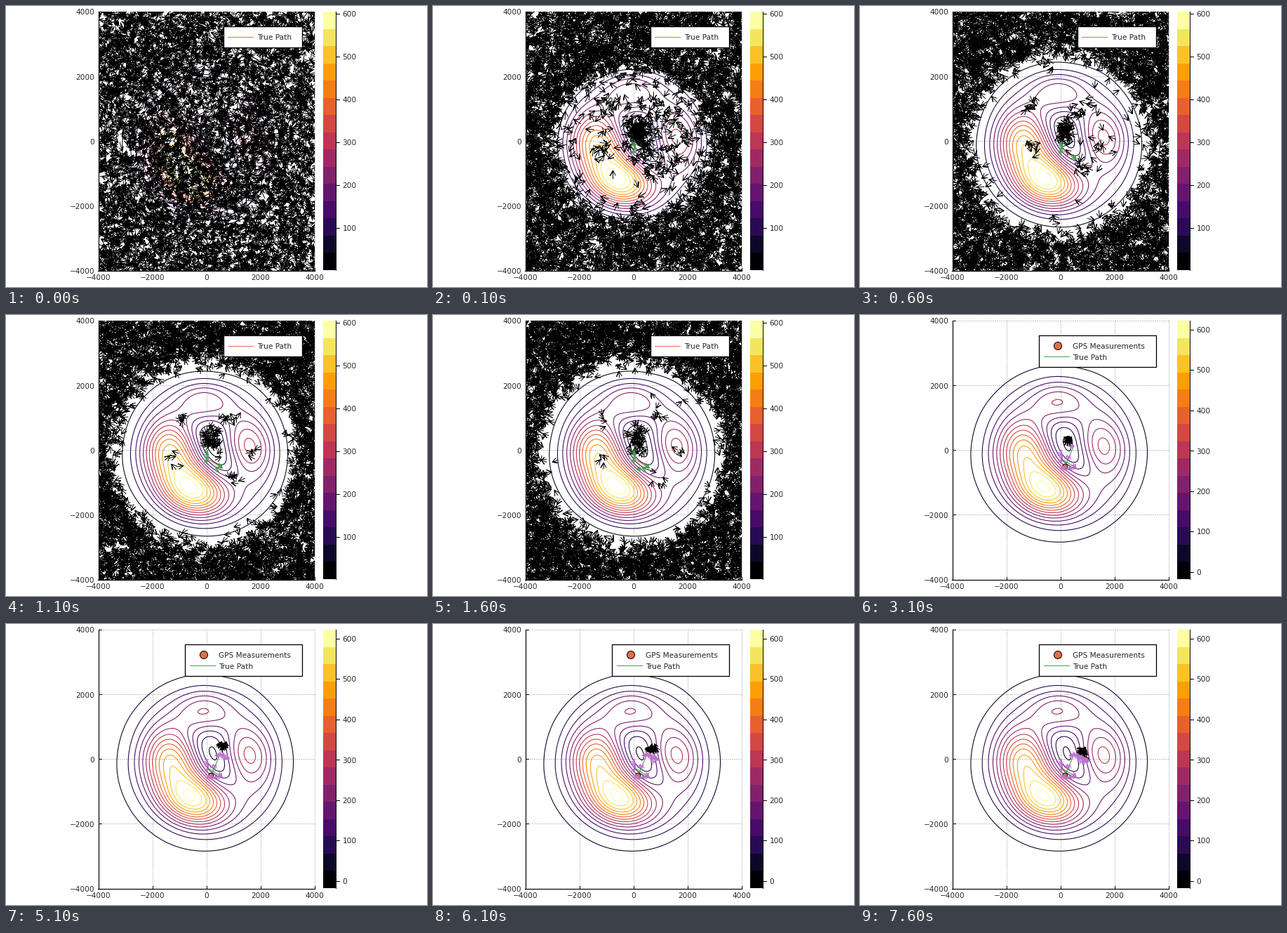
Write a matplotlib script that moves like this. It is 600x400 px and loops after 8000 ms.

```python
import numpy as np
import matplotlib.pyplot as plt
from matplotlib.animation import FuncAnimation
from matplotlib.collections import LineCollection
from matplotlib.patches import Circle, Rectangle

W, H = 600, 400
LEFT, RIGHT, TOP, BOTTOM = 131.5, 440, 8, 376.5
CENTER = np.array([(LEFT + RIGHT) / 2, (TOP + BOTTOM) / 2])
PX = 0.72  # one pixel in points
ORANGE, GREEN, PURPLE = "#E26F46", "#3DA44D", "#C271D2"
INK = "#262626"
STEPS = 17
LAYOUT_STEP = 5
GPS_STEPS = (5, 15)

fig = plt.figure(figsize=(W / 100, H / 100), dpi=100, facecolor="white")
ax = fig.add_axes([0, 0, 1, 1])
ax.axis("off")
frame_box = Rectangle((LEFT, TOP), RIGHT - LEFT, BOTTOM - TOP, fill=False, lw=0)
ax.add_patch(frame_box)


# ---- terrain: Gaussian hills through summits, saddles, dip and a bell-shaped rim ----
# offset right, offset up, height
KEYS = [
    (-24, -53, 615), (-51, -53, 471), (3, -53, 471), (-38, -28, 548),  # main summit
    (-48, 0, 490), (-36, 50, 235), (-3, 68, 263), (57, 0, 306),        # other hills
    (37, 44, 200), (38, -44, 195), (-2, -20, 216),                     # saddles, wall
    (6, 15, 43), (17, -18, 90), (-3, 39, 130),                         # basin
]
rim = []
for r in (109, 124, 148):
    for a in np.linspace(0, 2 * np.pi, 16, endpoint=False):
        rim.append((r * np.cos(a) - 2, r * np.sin(a) - 5, 735 * np.exp(-r ** 2 / 5650)))
keys = np.array(KEYS + rim, float)
knots = CENTER + keys[:, :2] * (1, -1)


def kernel(p):
    d2 = ((p[:, None, :] - knots[None, :, :]) ** 2).sum(-1)
    return np.exp(-d2 / 46 ** 2)


weights = np.linalg.solve(kernel(knots) + 1e-3 * np.eye(len(knots)), keys[:, 2])


def terrain(p):
    return kernel(p) @ weights


gx, gy = np.meshgrid(np.linspace(LEFT, RIGHT, 155), np.linspace(TOP, BOTTOM, 185))
gz = terrain(np.column_stack([gx.ravel(), gy.ravel()])).reshape(gx.shape)


# ---- chart furniture ----
def line(xs, ys, color="black", width=1.0, z=5, **kw):
    return ax.plot(xs, ys, color=color, lw=width * PX, zorder=z, **kw)[0]


def label(x, y, s, ha="left"):
    return ax.text(x, y, s, ha=ha, va="center_baseline", fontsize=10.5 * PX,
                   family="DejaVu Sans", color=INK, zorder=8)


for v in range(-4000, 4001, 2000):
    x, y = CENTER + v / 8000 * np.array([RIGHT - LEFT, TOP - BOTTOM])
    name = str(v).replace("-", "\u2212")
    label(x, 386.5, name, "center")
    label(126, y + 0.5, name, "right")
    dots = dict(color="#8c8c8c", z=0.5, linestyle=(0, (1, 2)))
    line([x, x], [TOP, BOTTOM], **dots)
    line([LEFT, RIGHT], [y, y], **dots)
    line([x, x], [BOTTOM, BOTTOM - 4])
    line([LEFT, LEFT + 4], [y, y])
line([LEFT, LEFT], [TOP, BOTTOM + 0.5], width=1.2)
line([LEFT - 0.5, RIGHT], [BOTTOM, BOTTOM], width=1.2)

shades = [plt.get_cmap("inferno")(k / 14) for k in range(15)]
cell = (BOTTOM - 0.5 - TOP) / 15
for k, c in enumerate(shades):
    ax.add_patch(Rectangle((452, BOTTOM - 0.5 - (k + 1) * cell), 18, cell,
                           fc=c, ec="none", lw=0, antialiased=False, zorder=4))
line([470, 470], [TOP, BOTTOM - 0.5])


def layout(first, low, gap, y100, per100, box_x, box_h):
    """Contours, colour scale and legend box of one chart layout."""
    levels = [low + gap * k for k in range(first, 15)]
    parts = [ax.contour(gx, gy, gz, levels=levels, colors=shades[first:],
                        linewidths=1.1 * PX, zorder=1)]
    for v in range(0, 601, 100):
        y = y100 - (v / 100 - 1) * per100
        if y < BOTTOM:
            parts += [line([470, 475], [y, y]), label(479.5, y + 0.5, str(v))]
    box = Rectangle((box_x, 29), 422 - box_x, box_h, fc="white", ec="black",
                    lw=1.3 * PX, zorder=6)
    return parts + [ax.add_patch(box)]


early = layout(0, 21, 40.2, 315.5, 61, 310, 30)
early += [line([316, 352], [44, 44], ORANGE, z=7), label(358.5, 44.5, "True Path")]

late = layout(1, 2.3, 42.67, 308, 57.5, 255, 45)
late += [ax.add_patch(Circle((282, 44), 5.5, fc=ORANGE, ec="black", lw=PX, zorder=7)),
         label(303, 44.5, "GPS Measurements"),
         line([262, 298], [59, 59], GREEN, z=7), label(303, 59.5, "True Path")]


# ---- arrows ----
def arrows(tips, angles, shaft, head, spread=0.5):
    """Open-headed arrows as polylines: tail, tip, wing, tip, wing."""
    def back(a, r):
        return tips - r * np.column_stack([np.cos(a), np.sin(a)])
    return np.stack([back(angles, shaft), tips, back(angles + spread, head),
                     tips, back(angles - spread, head)], axis=1)


# flat spots where particles linger: basin, saddles, small hills
SITES = [(291, 177), (320, 147), (322, 232), (247, 147), (244, 205), (347, 190)]


def survivors(p, step, rng):
    """Thin particles over high ground and gather some at the flat spots."""
    z = terrain(p)
    edge, soft = 30 + 45 / step ** 4, 6 + 6 / step
    chance = 1 / (1 + np.exp(np.clip((z - edge) / soft, -50, 50)))
    chance += 0.3 / step ** 2 * np.exp(-z / (50 + 100 / step ** 3))
    kept = [p[rng.random(len(p)) < chance]]
    for i, site in enumerate(SITES):
        count = 45 if i == 0 else round(36 / (step * (1 + i / 3)))
        spread = (5, 9) if i == 0 else 4 + 10 / step
        kept.append(rng.normal(site, spread, (count, 2)))
    return np.vstack(kept)


def cloud(step):
    rng = np.random.default_rng(40 + step)
    if step < LAYOUT_STEP:
        p = rng.uniform((LEFT - 4, TOP - 4), (RIGHT + 4, BOTTOM + 4),
                        (6500 + 1000 * step, 2))
        if step:
            p = survivors(p, step, rng)
        angles = rng.uniform(0, 2 * np.pi, len(p))
        return arrows(p, angles, 13 - step, 6 if step == 0 else 8)
    x, y = (np.interp(step, [5, 7, 11, 16], v)
            for v in ([292, 297, 310, 318], [179, 176, 171, 179]))
    p = rng.uniform((x - 5, y - 4), (x + 5, y + 3), (18, 2))
    return arrows(p, rng.normal(-1.3, 0.35, len(p)), 9, 7)


# step, x, y of the turns in the true path
TURNS = np.array([(0, 286, 202), (1, 288, 206), (2, 308, 218), (4, 293, 217),
                  (5, 292, 216), (7, 306, 186), (11, 316, 193), (16, 325, 193)])
shake = np.random.default_rng(3).normal(0, 1, (STEPS, 2))
path = np.column_stack([np.interp(np.arange(STEPS), TURNS[:, 0], TURNS[:, c])
                        for c in (1, 2)]) + shake


def path_arrows():
    rng = np.random.default_rng(7)
    tips = np.repeat(path, 2, axis=0) + rng.normal(0, 1.2, (2 * STEPS, 2))
    way = np.gradient(path, axis=0)
    angles = np.repeat(np.arctan2(way[:, 1], way[:, 0]), 2)
    return arrows(tips, angles + rng.normal(0, 0.6, len(tips)), 7, 6)


clouds = [cloud(s) for s in range(STEPS)]
path_segments = path_arrows()
particles = LineCollection([], colors="black", linewidths=PX, zorder=3,
                           joinstyle="round")
heads = LineCollection([], linewidths=PX, zorder=4.6, joinstyle="round")
for c in (particles, heads):
    ax.add_collection(c, autolim=False)
    c.set_clip_path(frame_box)
route = line([], [], width=1.1, z=4.2)
gps = [ax.add_patch(Circle(path[s], 3.5, fc=ORANGE, ec="black", lw=PX, zorder=4.4))
       for s in GPS_STEPS]

ax.set_xlim(0, W)
ax.set_ylim(H, 0)


def draw(i):
    step = (i + 4) // 5
    is_late = step >= LAYOUT_STEP
    for part in early:
        part.set_visible(not is_late)
    for part in late:
        part.set_visible(is_late)
    particles.set_segments(clouds[step])
    count = step + 1 if step else 0
    route.set_data(path[:count, 0], path[:count, 1])
    route.set_color(GREEN if is_late else ORANGE)
    heads.set_segments(path_segments[:2 * count])
    heads.set_color(PURPLE if is_late else GREEN)
    for s, mark in zip(GPS_STEPS, gps):
        mark.set_visible(step >= s)
    return []


anim = FuncAnimation(fig, draw, frames=80, interval=100, repeat=True,
                     repeat_delay=0, init_func=lambda: draw(0), blit=False)
plt.show()
```
